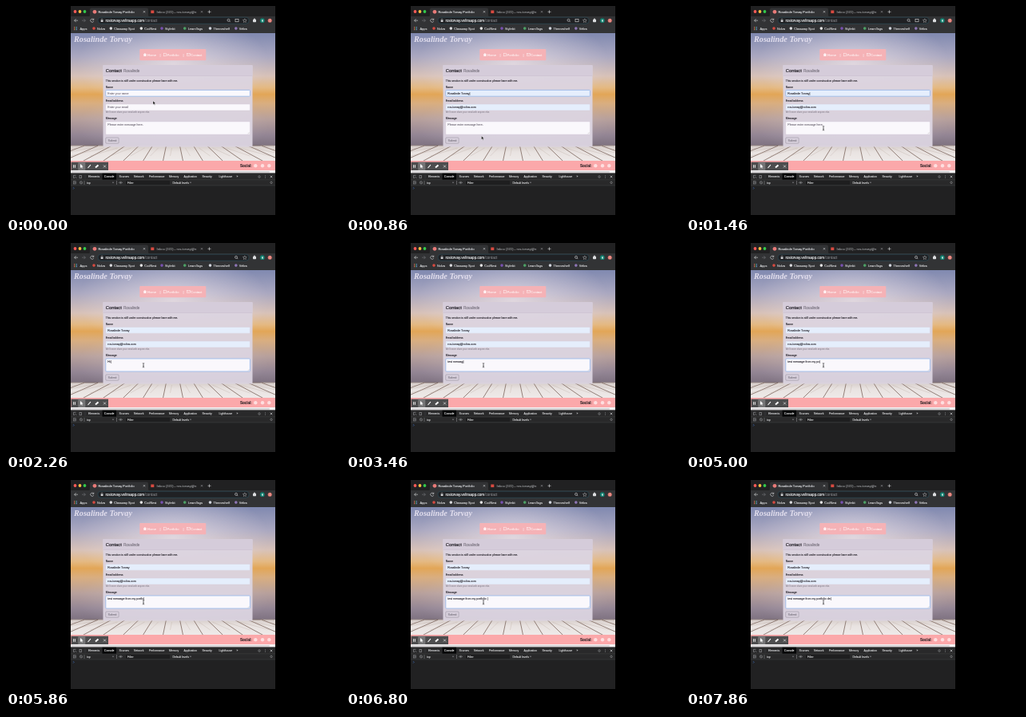
Animation of 418x262 px, one loop 8000 ms. Source, as an HTML page:

```html
<!DOCTYPE html>
<html lang="en">
<head>
<meta charset="utf-8">
<title>Contact form</title>
<style>
  html, body { margin: 0; width: 100%; height: 100%; overflow: hidden; background: #000; }
  svg { display: block; width: 100vw; height: 100vh; }
  text { font-family: "Liberation Sans", Arial, sans-serif; white-space: pre; }
  .script { font-family: "Liberation Serif", "Noto Serif", serif; font-style: italic; font-weight: 700; }
</style>
</head>
<body>
<svg id="stage" viewBox="0 0 418 262">
  <defs>
    <linearGradient id="sky" x2="0" y2="1">
      <stop offset="0" stop-color="#8089b0"/>
      <stop offset=".2" stop-color="#a9a7c0"/>
      <stop offset=".38" stop-color="#d8c2b8"/>
      <stop offset=".48" stop-color="#e4b983"/>
      <stop offset=".54" stop-color="#e2a657"/>
      <stop offset=".62" stop-color="#d9ae80"/>
      <stop offset=".76" stop-color="#b7a09c"/>
      <stop offset=".9" stop-color="#938594"/>
      <stop offset="1" stop-color="#7d717f"/>
    </linearGradient>
    <radialGradient id="glow">
      <stop offset="0" stop-color="#efe6ec" stop-opacity=".7"/>
      <stop offset="1" stop-color="#efe6ec" stop-opacity="0"/>
    </radialGradient>
    <linearGradient id="wood" x2="0" y2="1">
      <stop offset="0" stop-color="#d6cdca"/>
      <stop offset=".4" stop-color="#e9e3e1"/>
      <stop offset="1" stop-color="#efeae9"/>
    </linearGradient>
    <clipPath id="page"><rect x="81" y="34" width="256" height="172"/></clipPath>
  </defs>
  <g id="browser"></g>
  <g id="view" clip-path="url(#page)"></g>
  <g id="tools"></g>
  <path id="arrow" d="M0 0V4.6L1.1 3.6 1.9 5.3 2.6 5 1.8 3.3H3.3Z" fill="#111" stroke="#fff" stroke-width=".35"/>
  <path id="beam" d="M-1.2-2.6Q0-2.6 0-2V2Q0 2.6-1.2 2.6M1.2-2.6Q0-2.6 0-2M0 2Q0 2.6 1.2 2.6M-.6.8H.6" fill="none" stroke="#222" stroke-width=".6"/>
</svg>
<script>
const $ = id => document.getElementById(id);
let layer;

function add(tag, attrs, text = '') {
  const el = document.createElementNS('http://www.w3.org/2000/svg', tag);
  for (const key in attrs) el.setAttribute(key, attrs[key]);
  el.textContent = text;
  return layer.appendChild(el);
}
const box = (x, y, width, height, fill, more) => add('rect', { x, y, width, height, fill, ...more });
const dot = (cx, cy, r, fill, more) => add('circle', { cx, cy, r, fill, ...more });
const line = (d, stroke, w = .6, more) => add('path', { d, stroke, 'stroke-width': w, fill: 'none', ...more });
// The thin outline gives the small type a medium weight
const label = (x, y, size, str, fill, more) =>
  add('text', { x, y, 'font-size': size, fill, stroke: fill, 'stroke-width': .1, ...more }, str);
const cross = (x, y, r, c) => line(`M${x - r} ${y - r}l${2 * r} ${2 * r}m0 ${-2 * r}l${-2 * r} ${2 * r}`, c);
const move = (el, x, y) => el.setAttribute('transform', `translate(${x} ${y})`);
const show = (el, on) => el.setAttribute('visibility', on ? 'visible' : 'hidden');

// Tabs, address bar and bookmarks
const pale = '#dcdddf', grey = '#9a9c9f', bar = '#323335';
layer = $('browser');
box(81, 0, 256, 262, '#212122');
['#fc5b57', '#fdbc40', '#34c84a'].forEach((c, i) => dot(86.5 + i * 6, 7, 1.9, c));
add('path', { d: 'M103 13.5Q105 13.5 105 11V4.5Q105 2.5 107 2.5H176Q178 2.5 178 4.5V11Q178 13.5 180 13.5Z', fill: bar });
box(81, 13, 256, 21, bar);
dot(111, 7.3, 2.4, '#e87a78');
label(115.5, 8.7, 3.9, 'Rosalinde Torvay Portfolio', '#e8eaed');
cross(173, 7.3, 1.1, pale);
box(181.3, 5.5, 4, 3.6, '#d84a40');
label(188.5, 8.7, 4.2, 'Inbox (331) - ros.torvay@n', grey);
cross(245, 7.3, 1.1, grey);
line('M252.5 7.3h4m-2-2v4', pale);
line('M90 18.2h-4.4m2-2l-2 2 2 2', pale);
line('M95 18.2h4.4m-2-2l2 2-2 2', '#777a7e');
line('M109.6 17a2.1 2.1 0 1 0 .2 2M109.8 15.6v1.8h-1.8', pale);
box(115, 14.2, 189, 8.1, '#202124', { rx: 4, stroke: '#2d5966', 'stroke-width': .5 });
box(118.7, 17.6, 2.8, 2.3, pale);
line('M119.2 17.7v-.8a.9.9 0 0 1 1.8 0v.8', pale, .4);
const url = label(124.5, 19.9, 4.6, 'rostorvay.veltraapp.com', '#f1f3f4');
const path = document.createElementNS(url.namespaceURI, 'tspan');
path.setAttribute('fill', grey);
path.setAttribute('stroke', 'none');
path.textContent = '/contact';
url.append(path);
const lens = line('M1.1 1.1L2.3 2.3M1.5 0a1.5 1.5 0 1 1-3 0 1.5 1.5 0 1 1 3 0', pale);
const fillIcon = box(287, 16.4, 4, 3.4, 'none', { stroke: pale, 'stroke-width': .6 });
line('M298.8 15.9l.7 1.5 1.7.2-1.3 1.2.4 1.7-1.5-.9-1.5.9.4-1.7-1.3-1.2 1.7-.2z', pale, .4);
box(309, 16.7, 4, 3.5, pale, { rx: .6 });
dot(311, 16.5, .9, pale);
dot(320.8, 18.2, 2.9, '#12806f');
label(319.7, 19.5, 3.4, 'R', '#fff');
dot(330.2, 18.2, 2.5, '#e27a72');
[-1.2, 0, 1.2].forEach(d => dot(330.2, 18.2 + d, .4, '#fff'));

for (let i = 0; i < 9; i++) {
  box(85 + i % 3 * 1.5, 26.2 + Math.floor(i / 3) * 1.5, 1, 1, ['#e6594e', '#68a85b', '#5a8de0'][i % 3]);
}
label(92.5, 29.5, 3.9, 'Apps', pale);
[[110, 'Nolva', '#d84a40'], [131.3, 'Classway Spot', '#d9dadd'], [169.3, 'CodNest', '#e6e6e6'],
 [195, 'Stylekit', '#7952b3'], [223.7, 'LearnTags', '#4ca065'], [255.5, 'Themeshelf', '#d0d4dc'],
 [287.8, 'Veltra', '#8d76b6']].forEach(([x, name, c]) => {
  dot(x, 28.1, 1.8, c);
  label(x + 4, 29.5, 3.9, name, pale);
});

// Page scenery
layer = $('view');
box(81, 34, 256, 142, 'url(#sky)');
add('ellipse', { cx: 209, cy: 72, rx: 120, ry: 62, fill: 'url(#glow)' });
add('ellipse', { cx: 209, cy: 150, rx: 120, ry: 45, fill: 'url(#glow)', opacity: .5 });
box(81, 175, 256, 20, 'url(#wood)');
for (let k = -7; k <= 7; k++) {
  const top = 209 + (k - .5) * 17, foot = 209 + (k - .5) * 25;
  box(top, 174.6, 16.4, .9, k % 3 ? '#a3938d' : '#7c6b66');
  line(`M${top} 175L${foot} 194.3`, '#7d665d', .8);
  line(`M${top + 7} 178L${foot + 9} 188`, '#b5a39b', .5, { opacity: .6 });
}
box(81, 194, 256, 12, '#fba8aa');

label(85, 45.3, 10.2, 'Rosalinde Torvay', '#e3dfee', { class: 'script', 'stroke-width': 0 });
box(167.3, 54, 83, 14.2, '#f5b2b6', { rx: 1 });
const white = '#fff1f2';
add('path', { d: 'M171.6 61l2.3-2 2.3 2h-.7v2h-3.2v-2z', fill: white });
label(177, 62.6, 4.1, 'Home', white);
label(192.5, 62.6, 4.1, '|', white);
box(197.7, 59.2, 2.8, 3.6, 'none', { stroke: white, 'stroke-width': .5 });
label(201.5, 62.6, 4.1, 'Portfolio', white);
label(221.5, 62.6, 4.1, '|', white);
box(226.5, 59.5, 3.8, 3, 'none', { stroke: white, 'stroke-width': .5 });
line('M226.6 59.8l1.8 1.4 1.8-1.4', white, .4);
label(231.2, 62.6, 4.1, 'Contact', white);

// Form card
const ink = '#27242b', muted = '#77717d';
box(121.5, 74, 187, 102.5, '#dcd4e1', { rx: 1, opacity: .95 });
box(121.5, 74, 187, 13.4, '#d5ccda', { rx: 1 });
line('M121.5 87.5h187', '#c6bdca', .5);
label(124.8, 83, 5.8, 'Contact', ink, { 'stroke-width': .22 });
label(147, 83, 4.6, 'Rosalinde', muted);
label(124.8, 94.6, 3.48, 'This section is still under construction please bare with me.', ink);
label(124.8, 102.8, 3.45, 'Name', ink);
label(124.8, 120.4, 3.45, 'Email address', ink);
label(124.8, 134, 2.7, "We'll never share your email with anyone else.", muted, { 'stroke-width': 0 });
label(124.8, 142.3, 3.45, 'Message', ink);

function field(y, height, hint) {
  const frame = box(124.8, y, 180.6, height, '', { rx: .9 });
  const text = label(127.3, y + 5.1, 3.55, hint, muted);
  return (value, filled, focus) => {
    const color = value ? ink : muted;
    frame.setAttribute('fill', filled ? '#e5eefc' : '#faf8fc');
    frame.setAttribute('stroke', focus ? '#94b6ea' : '#d3ccda');
    frame.setAttribute('stroke-width', focus ? .8 : .4);
    text.textContent = value || hint;
    text.setAttribute('fill', color);
    text.setAttribute('stroke', color);
  };
}
const nameField = field(105.4, 7.8, 'Enter your name');
const mailField = field(123.1, 7.8, 'Enter your email');
const noteField = field(145, 16, 'Please enter message here.');
line('M302.5 160.3l2-2m-1 2l1-1', '#999', .3);
box(124.8, 165, 16.3, 7.2, 'none', { rx: 1, stroke: '#8f8895', 'stroke-width': .5 });
label(127.6, 169.9, 3.5, 'Submit', muted);

label(293, 202, 4.5, 'Social:', '#2d2426', { 'font-weight': 700 });
[312.3, 321, 329.3].forEach(x => dot(x, 200.3, 2.2, '#fff0f0', { opacity: .75 }));

// Recorder bar and developer tools
layer = $('tools');
box(81, 206, 256, 3.6, '#f6f4f5');
box(82, 206.9, 248, 1.8, '#d2d0d2', { rx: .9 });
box(81.5, 195.7, 46.5, 10.3, '#4d4d4e');
box(90.3, 195.7, 9, 10.3, '#757576');
line('M84.6 199.2v3.6m1.8-3.6v3.6', '#fff', .9);
add('path', { d: 'M93 198v5l1.2-1 .8 1.6.8-.4-.7-1.6h1.5z', fill: '#fff' });
line('M102.5 203l3.4-3.8', '#fff', 1.1);
line('M112 202.5l3.5-3', '#fff', 2);
cross(123.5, 201, 1.5, '#fff');

box(81, 209.6, 256, 15.4, '#29292a');
line('M81 217.8h256M81 225h256', '#434445', .5);
line('M87.5 212.3h-3v3.2h1.5m.3-1.6l2 2', grey);
box(92, 212.3, 2.6, 3.5, 'none', { stroke: grey, 'stroke-width': .6 });
line('M99 211.5v5', '#55575b', .4);
box(120.5, 209.8, 17.5, 7.9, '#060708');
[[103, 'Elements'], [123, 'Console'], [141.5, 'Sources'], [160, 'Network'], [179, 'Performance'],
 [204, 'Memory'], [222.5, 'Application'], [245.5, 'Security'], [266.5, 'Lighthouse'], [288.5, '»']]
  .forEach(([x, name]) => label(x, 215.2, 3.4, name, name === 'Console' ? '#fff' : pale));
const gear = (x, y) => dot(x, y, 1.2, 'none', { stroke: grey, 'stroke-width': .9, 'stroke-dasharray': '.7 .25' });
gear(317, 214);
[-1.3, 0, 1.3].forEach(d => dot(324.5, 214 + d, .45, grey));
cross(332, 214, 1.3, pale);
box(84.5, 219.8, 3.2, 3.2, 'none', { stroke: grey, 'stroke-width': .5 });
line('M85.6 220.5l1.4.9-1.4.9z', grey, .4);
dot(94, 221.4, 1.6, 'none', { stroke: grey, 'stroke-width': .6 });
line('M92.9 220.3l2.2 2.2M98 219v5M138.5 219v5', grey, .5);
label(101, 222.6, 3.4, 'top', pale);
const caretDown = x => add('path', { d: `M${x} 220.7h2l-1 1.5z`, fill: grey });
caretDown(133);
line('M141.3 221.4q2.2-2.6 4.4 0-2.2 2.6-4.4 0', grey, .5);
dot(143.5, 221.4, .7, grey);
box(150, 218.9, 55, 5.1, '#1e1e1f');
label(152, 222.6, 3.4, 'Filter', pale);
label(208.5, 222.6, 3.4, 'Default levels', pale);
caretDown(230);
gear(332, 221.4);
line('M84 227.2l1.2 1.2-1.2 1.2', '#4380d8', .6);

// Motion
const note = 'test message from my portfolio de';
const typing = [[2700, 0], [3460, 11], [5000, 23], [6660, 31], [7400, 32], [7860, 33]];
const pathX = [[0, 184], [260, 184], [860, 169.5], [1060, 169.5], [1460, 172]];
const pathY = [[0, 119], [260, 119], [860, 163], [1060, 163], [1460, 153.3]];

function along(keys, t) {
  const i = keys.findIndex(key => key[0] > t);
  if (i === 0) return keys[0][1];
  if (i < 0) return keys[keys.length - 1][1];
  const [a, from] = keys[i - 1], [b, to] = keys[i];
  return from + (to - from) * (t - a) / (b - a);
}

function noteText(t) {
  if (t >= 2700) return note.slice(0, Math.floor(along(typing, t) + 1e-6));
  if (t < 1930 || t >= 2530) return '';
  return t < 2060 || t >= 2400 ? 'H' : 'Hi';
}

function draw(now) {
  const t = now % 8000;
  const filled = t >= 400, writing = t >= 1600;
  nameField(filled ? 'Rosalinde Torvay' + (writing ? '' : '|') : '', filled, !writing);
  mailField(filled ? 'ros.torvay@nolva.com' : '', filled, false);
  const typed = noteText(t);
  noteField(typed && typed + '|', false, writing);

  const x = along(pathX, t), y = along(pathY, t);
  const overText = t >= 1330;
  move($('arrow'), x, y);
  move($('beam'), x, y);
  show($('arrow'), !overText);
  show($('beam'), overText);
  move(lens, writing ? 288 : 278.5, 17.8);
  show(fillIcon, !writing);
  requestAnimationFrame(draw);
}
draw(performance.now());
</script>
</body>
</html>
```
